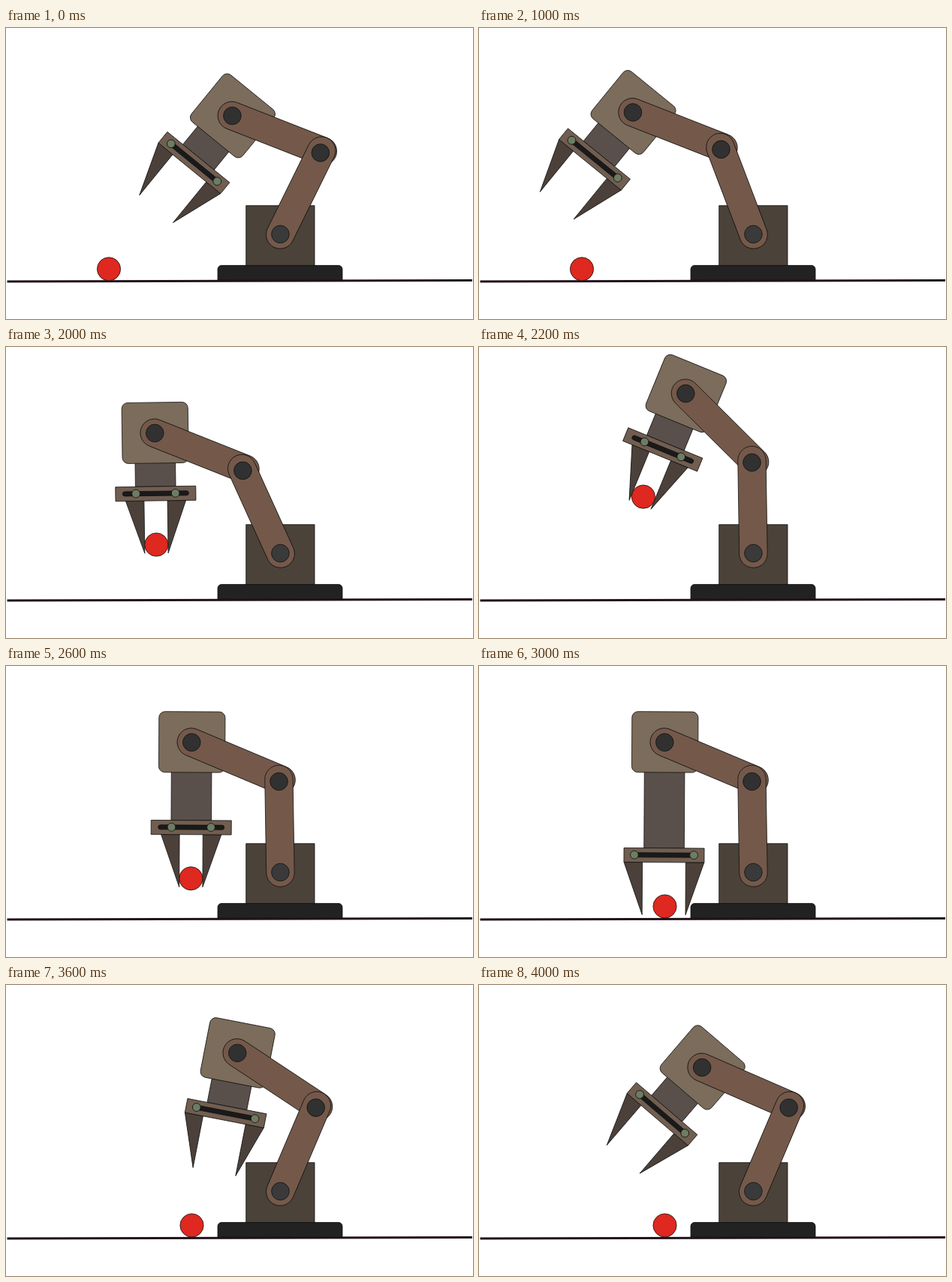
Recreate the animation shown at these times as an HTML page with a canvas. Size 622 px wide and 388 px high, loop 4200 ms.

```html
<!DOCTYPE html>
<html lang="en">
<head>
<meta charset="utf-8">
<title>Robot arm</title>
<style>
html, body { margin: 0; width: 100%; height: 100%; overflow: hidden; background: #fff; }
canvas { display: block; }
</style>
</head>
<body>
<canvas id="stage" width="622" height="388"></canvas>
<script>
const ctx = document.getElementById('stage').getContext('2d');
const RAD = Math.PI / 180;
const UPPER = 121, FORE = 127.4, SHOULDER = [365.4, 275];
const IN = 71.2, MID = 104, OUT = 141, BACK = 72.2;   // reach of the gripper below the wrist
const OPEN = 39.6, SHUT = 26.3;                       // distance of the pins from the middle
const FIRST = 1000, STEP = 200, LOOP = 4200;
const START = [137, 321.4], NUDGED = [153, 320.8], END = [247.5, 320.5];

// upper arm angle, forearm angle, hand tilt, reach, grip, ball (in the claws if absent)
const poses = [
  [26.2, 22.8, 39.2, IN, OPEN, START],
  [-20.8, 22.8, 39.2, IN, OPEN, START],
  [-20.8, -1.2, 15.3, IN, OPEN, START],
  [-20.8, -1.2, 15.3, IN, SHUT, NUDGED],
  [-24.4, -4.6, 11.9, IN, SHUT],
  [-24.4, 23.1, 39.2, IN, SHUT],
  [-24.4, 23.1, -0.8, IN, SHUT],
  [-0.9, 46.2, 22.3, IN, SHUT],
  [-0.9, 24.2, 0.3, IN, SHUT],
  [-0.9, 24.2, 0.3, MID, SHUT],
  [-0.9, 24.2, 0.3, OUT, SHUT],
  [-0.9, 24.2, 0.3, OUT, OPEN, END],
  [-0.9, 24.2, 0.3, BACK, OPEN, END],
  [23, 48, 24.1, BACK, OPEN, END],
  [23, 34.9, 11, BACK, OPEN, END],
  [23, 34.9, 50.6, BACK, OPEN, END],
  [23, 24.9, 40.6, BACK, OPEN, END]
];

function paint(fill, draw) {
  ctx.beginPath();
  draw();
  ctx.fillStyle = fill;
  ctx.fill();
  ctx.stroke();
}

const box = (fill, x, y, w, h, r = 0) => paint(fill, () => ctx.roundRect(x, y, w, h, r));
const disc = (fill, x, y, r) => paint(fill, () => ctx.arc(x, y, r, 0, 7));

function at([x, y], angle, draw) {
  ctx.save();
  ctx.translate(x, y);
  ctx.rotate(angle);
  draw();
  ctx.restore();
}

const link = (from, angle, length) => at(from, angle, () =>
  box('#74594a', -19.3, -18.7, length + 40, 37.4, 18.7));

function claw(pin, side, top) {
  const inner = pin - side * 10.7;
  paint('#4b413a', () => {
    ctx.moveTo(pin + side * 13.8, top);
    ctx.lineTo(inner, top);
    ctx.lineTo(inner, top + 70);
    ctx.closePath();
  });
}

function hand(reach, grip) {
  box('#5a504b', -26.8, 0, 53.6, reach);
  box('#7b6c5b', -43.7, -40.9, 88.2, 81, 8);
  claw(-grip, -1, reach + 19);
  claw(grip, 1, reach + 19);
  box('#715e51', -53.5, reach, 107, 19);
  box('#1a1a1a', -44, reach + 6.3, 88, 6, 3);
  disc('#6c7d63', -grip, reach + 9.2, 5.4);
  disc('#6c7d63', grip, reach + 9.2, 5.4);
}

function scene([lift, bend, tilt, reach, grip, ball]) {
  const a = lift * RAD, b = bend * RAD, t = tilt * RAD;
  const elbow = [SHOULDER[0] + UPPER * Math.sin(a), SHOULDER[1] - UPPER * Math.cos(a)];
  const wrist = [elbow[0] - FORE * Math.cos(b), elbow[1] - FORE * Math.sin(b)];
  const hold = reach + 77.5;
  const [bx, by] = ball || [wrist[0] - hold * Math.sin(t), wrist[1] + hold * Math.cos(t)];

  ctx.fillStyle = '#fff';
  ctx.fillRect(0, 0, 622, 388);

  ctx.strokeStyle = '#24121d';
  ctx.lineWidth = 3;
  ctx.beginPath();
  ctx.moveTo(1.5, 338);
  ctx.lineTo(621, 336.4);
  ctx.stroke();

  ctx.strokeStyle = '#111';
  ctx.lineWidth = 0.8;
  box('#4b4239', 319.7, 236.8, 91.3, 80.5);
  box('#222', 282, 316.6, 166, 19.4, [5, 5, 0, 0]);

  at(wrist, t, () => hand(reach, grip));
  disc('#de2820', bx, by, 15.6);
  // the forearm sits slightly askew on its joints
  link(wrist, b - 1.4 * RAD, FORE);
  link(SHOULDER, a - Math.PI / 2, UPPER + 1);
  disc('#313131', ...wrist, 11.8);
  disc('#313131', ...elbow, 11.8);
  disc('#3a3a3a', ...SHOULDER, 11.8);
}

const begin = performance.now();
function tick() {
  const t = (performance.now() - begin) % LOOP;
  scene(poses[t < FIRST ? 0 : 1 + Math.floor((t - FIRST) / STEP)]);
  requestAnimationFrame(tick);
}
tick();
</script>
</body>
</html>
```
